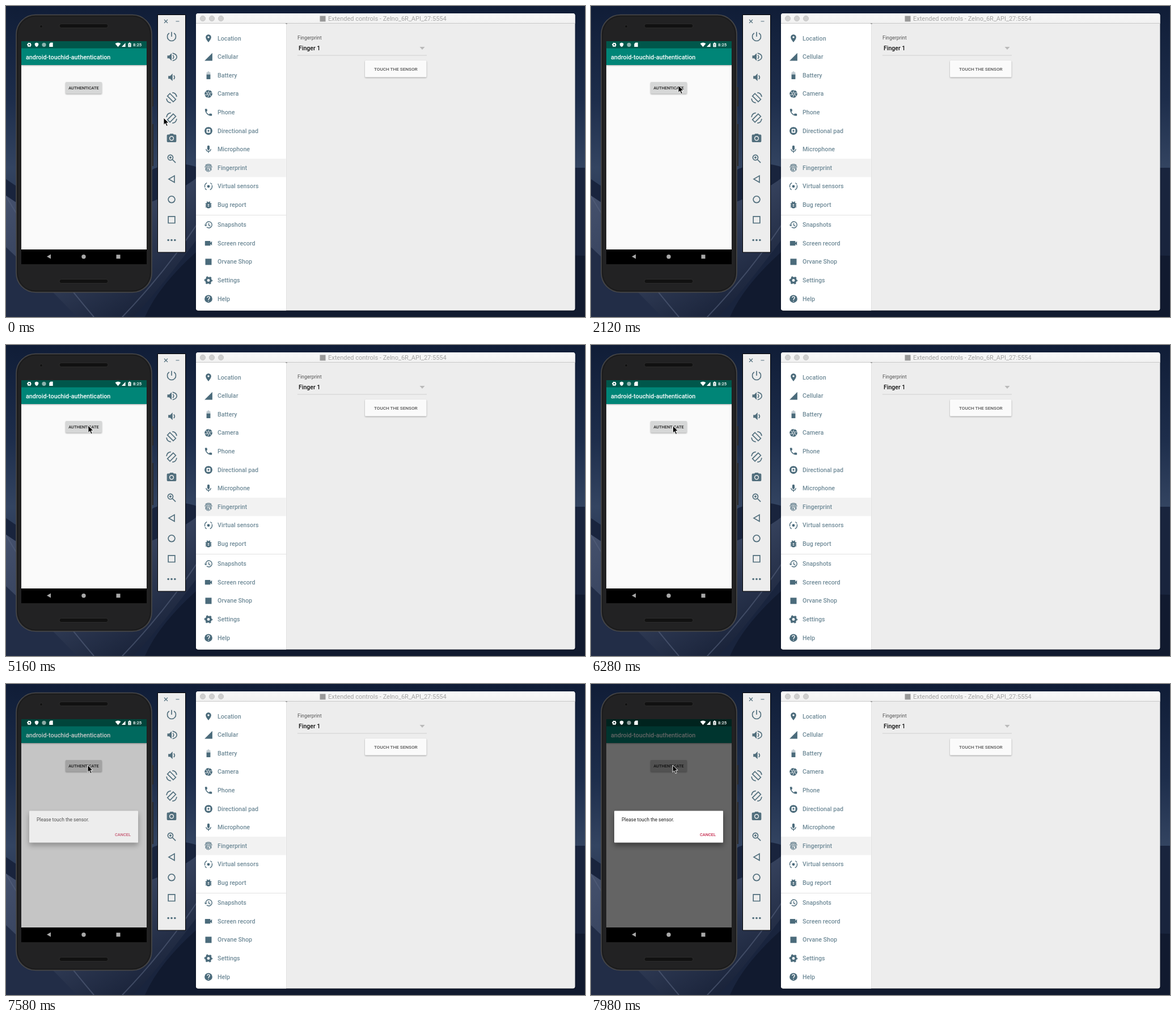
These frames come from a looping animation (1021x548 px, 8000 ms). An HTML page:

```html
<!DOCTYPE html>
<html lang="en">
<head>
<meta charset="utf-8">
<title>Fingerprint authentication</title>
<style>
  html, body { margin: 0; width: 100%; height: 100%; overflow: hidden; background: #111b31; }
  svg { display: block; font-family: Roboto, sans-serif; }
  .medium { font-weight: 500; }
  .line { fill: none; stroke: currentColor; stroke-width: 2; }
  .raised { filter: drop-shadow(0 1px 1px #0005); }
  #dialog { filter: drop-shadow(0 5px 5px #0006); }
</style>
</head>
<body>
<svg width="1021" height="548" viewBox="0 0 1021 548">
  <defs>
    <linearGradient id="sky" x2="0" y2="1">
      <stop stop-color="#101d37"/><stop offset=".3" stop-color="#1d2d4b"/>
      <stop offset=".52" stop-color="#334461"/><stop offset=".75" stop-color="#202c47"/>
      <stop offset="1" stop-color="#121b30"/>
    </linearGradient>
    <linearGradient id="dune" x2=".8" y2="1">
      <stop stop-color="#485470"/><stop offset=".5" stop-color="#35415c"/><stop offset="1" stop-color="#151e34"/>
    </linearGradient>
    <linearGradient id="bar" x2="0" y2="1">
      <stop stop-color="#f9f9f9"/><stop offset="1" stop-color="#f1f1f1"/>
    </linearGradient>
  </defs>

  <g id="wallpaper">
    <path fill="url(#sky)" d="M0 0h1021v548H0z"/>
    <path fill="#19243d" d="M0 305Q130 400 260 287Q300 270 340 285H1021V548H0z"/>
    <path fill="url(#dune)" d="M0 334Q90 400 200 365T345 295V400Q270 500 225 548H0z"/>
    <path fill="#222d47" d="M0 425Q80 500 125 548H0z"/>
    <path fill="none" stroke="#56627c" stroke-width="2" opacity=".6" d="M0 335Q55 430 155 548M340 380Q280 470 205 548"/>
    <path fill="#111a2f" d="M345 425Q270 490 245 548H1021V440z"/>
  </g>

  <g id="phone">
    <path fill="#29292a" d="M256 143h4v34h-4zM256 208h4v74h-4z"/>
    <rect x="18" y="15.500" width="239" height="489" rx="34" fill="#222223" stroke="#49494a" stroke-width="1.500"/>
    <rect x="20.500" y="18" width="234" height="484" rx="32" fill="none" stroke="#171718"/>
    <g fill="#111" stroke="#303030" stroke-width=".8">
      <rect x="94" y="31.500" width="86" height="7" rx="3.500"/>
      <rect x="94" y="481.500" width="86" height="7" rx="3.500"/>
      <circle cx="62" cy="36" r="2.500"/>
    </g>
    <path fill="#fafafa" d="M27 62h221v367H27z"/>
    <path fill="#00574b" d="M27 62h221v13H27z"/>
    <path class="raised" fill="#008577" d="M27 74.500h221v29.500H27z"/>
    <text class="medium" x="35" y="94" font-size="10.800" fill="#fff">android-touchid-authentication</text>
    <rect id="button" class="raised" x="105" y="134" width="64" height="20.500" rx="1.500"/>
    <text class="medium" x="137" y="147.200" font-size="7.450" text-anchor="middle" fill="#222">AUTHENTICATE</text>
    <path id="dim" d="M27 62h221v367H27z"/>
    <g fill="#fff">
      <g id="status"></g>
      <path d="M54 64.500l3.200 1.200v2.600q-.5 2.600-3.200 3.800q-2.700-1.200-3.200-3.800v-2.600z"/>
      <circle cx="67" cy="68.300" r="3.600" opacity=".55"/>
      <path d="M78.500 64.500h4.200v7.600H76.300V66.800z"/>
      <path d="M192.500 66.200q5-3.600 10 0l-5 6zM204 72h6.600v-7z"/>
      <path fill-rule="evenodd" d="M217 64.500h2v.9h1.600v6.900h-5.200v-6.900h1.600zM217.500 67v2.300h1V67zM217.500 70v1h1v-1z"/>
      <text class="medium" x="224" y="71.200" font-size="7.700">8:25</text>
    </g>
    <path d="M27 429h221v26H27z"/>
    <path fill="#a9a9a9" d="M72 441.500l7-4v8zM194.500 438.200h7v7h-7z"/>
    <circle cx="137" cy="441.700" r="3.700" fill="#a9a9a9"/>
    <g id="dialog">
      <rect x="41" y="223.500" width="192" height="56" rx="1" fill="#fff"/>
      <text x="54" y="242.200" font-size="8.500" fill="#222">Please touch the sensor.</text>
      <text class="medium" x="192" y="267.500" font-size="7.400" fill="#c5274c">CANCEL</text>
    </g>
  </g>

  <g id="toolbar" color="#526f7d">
    <path fill="#ededed" stroke="#000" d="M267.500 15.500h49v418.500h-49z"/>
    <path class="line" style="stroke-width:1.200" d="M279 24l6 6m0-6l-6 6M299.500 27h6"/>
  </g>

  <g id="controls" color="#4b6b7b">
    <rect class="raised" x="335" y="13" width="668.500" height="523.500" rx="4" fill="#ededed"/>
    <path fill="#fff" d="M335 30h159v506.500H339q-4 0-4-4z"/>
    <path fill="url(#bar)" d="M335 30.500V17q0-4 4-4h660.500q4 0 4 4v13.500z"/>
    <path stroke="#c9c9c9" d="M335 30.500h668.500"/>
    <path stroke="#e1e1e1" d="M494.500 31v505"/>
    <path stroke="#777" d="M493 31h3"/>
    <g fill="#cfcfcf" stroke="#bcbcbc" stroke-width=".7">
      <circle cx="347" cy="22" r="4.700"/><circle cx="363" cy="22" r="4.700"/><circle cx="379" cy="22" r="4.700"/>
    </g>
    <path fill="#999" d="M553.500 17.500h10v10h-10z"/>
    <text x="568" y="26.200" font-size="11" fill="#a3a3a3">Extended controls - Zelno_6R_API_27:5554</text>
    <path fill="#f2f2f2" d="M335 269h158.500v32.500H335z"/>
    <path stroke="#e2e2e2" d="M335 368.500h159"/>
    <text x="514" y="59" font-size="8.900" fill="#555">Fingerprint</text>
    <text class="medium" x="516" y="77.700" font-size="10.500" fill="#111">Finger 1</text>
    <path fill="#bababa" d="M729.500 72h9l-4.500 5z"/>
    <path stroke="#cfcfcf" d="M514 87h228"/>
    <rect class="raised" x="633" y="96" width="108.500" height="29.500" rx="1.500" fill="#fafafa"/>
    <text class="medium" x="687.300" y="113.600" font-size="8.100" text-anchor="middle" fill="#555">TOUCH THE SENSOR</text>
  </g>

  <path id="cursor" stroke="#fff" stroke-width=".9" d="M0 0v12.500l2.900-2.700 2.100 4.900 2.200-.9-2.100-4.800h4z"/>
</svg>

<script>
const $ = id => document.getElementById(id);
const fill = d => `<path fill="currentColor" fill-rule="evenodd" d="${d}"/>`;
const line = d => `<path class="line" d="${d}"/>`;
const disc = (r, x = 12, y = 12) => `<circle cx="${x}" cy="${y}" r="${r}" fill="currentColor"/>`;
// Icons are drawn on a 24-unit grid and placed by their centre.
const icon = (x, y, size, body) =>
  `<g transform="translate(${x - size / 2} ${y - size / 2}) scale(${size / 24})">${body}</g>`;

const gear = `<circle cx="12" cy="12" r="6" fill="none" stroke="currentColor" stroke-width="5"/>
  <circle cx="12" cy="12" r="9" fill="none" stroke="currentColor" stroke-width="3" stroke-dasharray="4.700" stroke-dashoffset="2.300"/>`;
const speaker = 'M3 9v6h4l5 5V4L7 9z';
const rotate = line('M8.500 3.200L20.800 15.500l-5.300 5.300L3.200 8.500z')
  + line('M13.500 1.200q8 .5 9.300 9M10.500 22.800q-8-.5-9.300-9');

const rows = [
  ['Location', fill('M12 2C8.130 2 5 5.130 5 9c0 5.250 7 13 7 13s7-7.750 7-13c0-3.870-3.130-7-7-7zm0 4.500a2.500 2.500 0 1 1 0 5a2.500 2.500 0 1 1 0-5z')],
  ['Cellular', fill('M2 22h20V2z')],
  ['Battery', `<g opacity=".35">${fill('M7 11V5q0-1 1-1h2V2h4v2h2q1 0 1 1v6z')}</g>` + fill('M7 10h10v11q0 1-1 1H8q-1 0-1-1z')],
  ['Camera', disc(10) + '<path stroke="#fff" stroke-width="1.200" fill="none" d="M14.500 2L9 11.500M22 9.500H11.500M19.500 19.500L14 10M9.500 22L15 12.500M2 14.500h10.500M4.500 4.500L10 14"/>'],
  ['Phone', fill('M6.600 10.800c1.400 2.800 3.800 5.100 6.600 6.600l2.200-2.200q.5-.5 1-.3q1.700.6 3.600.6 1 0 1 1V20q0 1-1 1C10.600 21 3 13.400 3 4q0-1 1-1h3.500q1 0 1 1 0 1.900.6 3.600.2.500-.3 1z')],
  ['Directional pad', fill('M12 2a10 10 0 1 0 .01 0zM8 7h8l1 1v8l-1 1H8l-1-1V8zM12 9l3 3-3 3-3-3z')],
  ['Microphone', fill('M12 2q3 0 3 3v6q0 3-3 3t-3-3V5q0-3 3-3z') + line('M6 11q0 6 6 6t6-6M12 17v4')],
  ['Fingerprint', `<g opacity=".75" stroke-linecap="round">${line('M5 5a11 11 0 0 1 14 0M3 10c4-7 14-7 18 0M5 18c-1-7 2-10.500 7-10.500s8 4 7 10M8 21c-3-7-1-10 4-10s6 5 5 8M12 14c0 4 1 6 3 7M9.500 15c0 4 1 5 2 7')}</g>`],
  ['Virtual sensors', disc(3.500) + line('M3 15a9.500 9.500 0 0 1 5-12M21 9a9.500 9.500 0 0 1-5 12M3 17l4 4M17 3l4 4')],
  ['Bug report', fill('M12 5q6 0 6 6v4q0 6-6 6t-6-6v-4q0-6 6-6zM10 10v2h4v-2zM10 14v2h4v-2z') + line('M4 9h16M4 13h3m10 0h3M4 17h16M8 3.500l3 3M16 3.500l-3 3').replace('M4 9h16', 'M4 9h4m8 0h4').replace('M4 17h16', 'M4 17h4m8 0h4')],
  ['Snapshots', line('M5 12a8 8 0 1 1 2.500 5.700M12.800 8v5l4 2.300') + fill('M1 12h8l-4 4z')],
  ['Screen record', fill('M17 10.500V7q0-1-1-1H4q-1 0-1 1v10q0 1 1 1h12q1 0 1-1v-3.500l4 4v-11z')],
  ['Orvane Shop', fill('M4 4h16v16H4z')],
  ['Settings', gear],
  ['Help', disc(10) + '<path fill="none" stroke="#fff" stroke-width="2" d="M9 9q0-3 3-3t3 3q0 1.500-1.500 2.800T12 15M12 17v2"/>'],
];
$('controls').innerHTML += rows.map(([label, art], i) => {
  const y = 57 + 32.600 * i + (i > 9 ? 2.600 : 0);
  return icon(357, y, 16.500, art)
    + `<text class="medium" x="373" y="${y + 3.600}" font-size="10.700" fill="#718c99">${label}</text>`;
}).join('');

const tools = [
  line('M12 2v10M7 4.500a9 9 0 1 0 10 0'),
  fill(speaker) + line('M14.500 8q4 4 0 8M14 4q9 2 9 8t-9 8'),
  `<g transform="translate(2)">${fill(speaker) + line('M14.500 8q4 4 0 8')}</g>`,
  rotate,
  `<g transform="matrix(-1 0 0 1 24 0)">${rotate}</g>`,
  fill('M9 2L7.200 4H4Q2 4 2 6v12q0 2 2 2h16q2 0 2-2V6q0-2-2-2h-3.200L15 2zM12 7a5 5 0 1 1 0 10a5 5 0 1 1 0-10z') + disc(3.200),
  line('M9.500 4a5.500 5.500 0 1 0 .01 0zM14 14l6.500 6.500M7 9.500h5M9.500 7v5'),
  line('M18 5v14L6 12z'),
  line('M12 5a7 7 0 1 0 .01 0z'),
  line('M5 5h14v14H5z'),
  disc(2.200, 5) + disc(2.200) + disc(2.200, 19),
];
$('toolbar').innerHTML += tools.map((art, i) => icon(292, 54 + 35.850 * i, 20, art)).join('');
$('status').innerHTML = `<g color="#fff">${icon(41, 68.300, 9, gear)}</g>`;

// Each key is [time, ...values]; the motion eases between keys.
const cursorKeys = [[0, 278, 197], [550, 278, 197], [1450, 154, 140], [2500, 154, 140], [3240, 151, 140],
  [4180, 151, 140], [4920, 145, 142], [5860, 145, 142], [6600, 144, 143], [8000, 144, 143]];
const dialogKeys = [[0, 0], [7439, 0], [7440, .13], [7539, .13], [7540, .5], [7580, .7], [7679, .7], [7680, .9], [7760, 1], [8000, 1]];
const dimKeys = [[0, 0], [7539, 0], [7540, .12], [7580, .21], [7679, .21], [7680, .34], [7900, .6], [8000, .6]];

function at(keys, t) {
  const i = keys.findIndex(key => key[0] > t);
  const a = keys[i - 1], b = keys[i];
  const p = (t - a[0]) / (b[0] - a[0]);
  const eased = p * p * (3 - 2 * p);
  return a.slice(1).map((v, k) => v + (b[k + 1] - v) * eased);
}

function draw() {
  const t = performance.now() % 8000;
  $('cursor').setAttribute('transform', `translate(${at(cursorKeys, t)})`);
  $('dialog').setAttribute('opacity', at(dialogKeys, t)[0]);
  $('dim').setAttribute('opacity', at(dimKeys, t)[0]);
  $('button').setAttribute('fill', t < 7400 ? '#d6d7d7' : '#cecece');
  requestAnimationFrame(draw);
}
draw();
</script>
</body>
</html>
```
